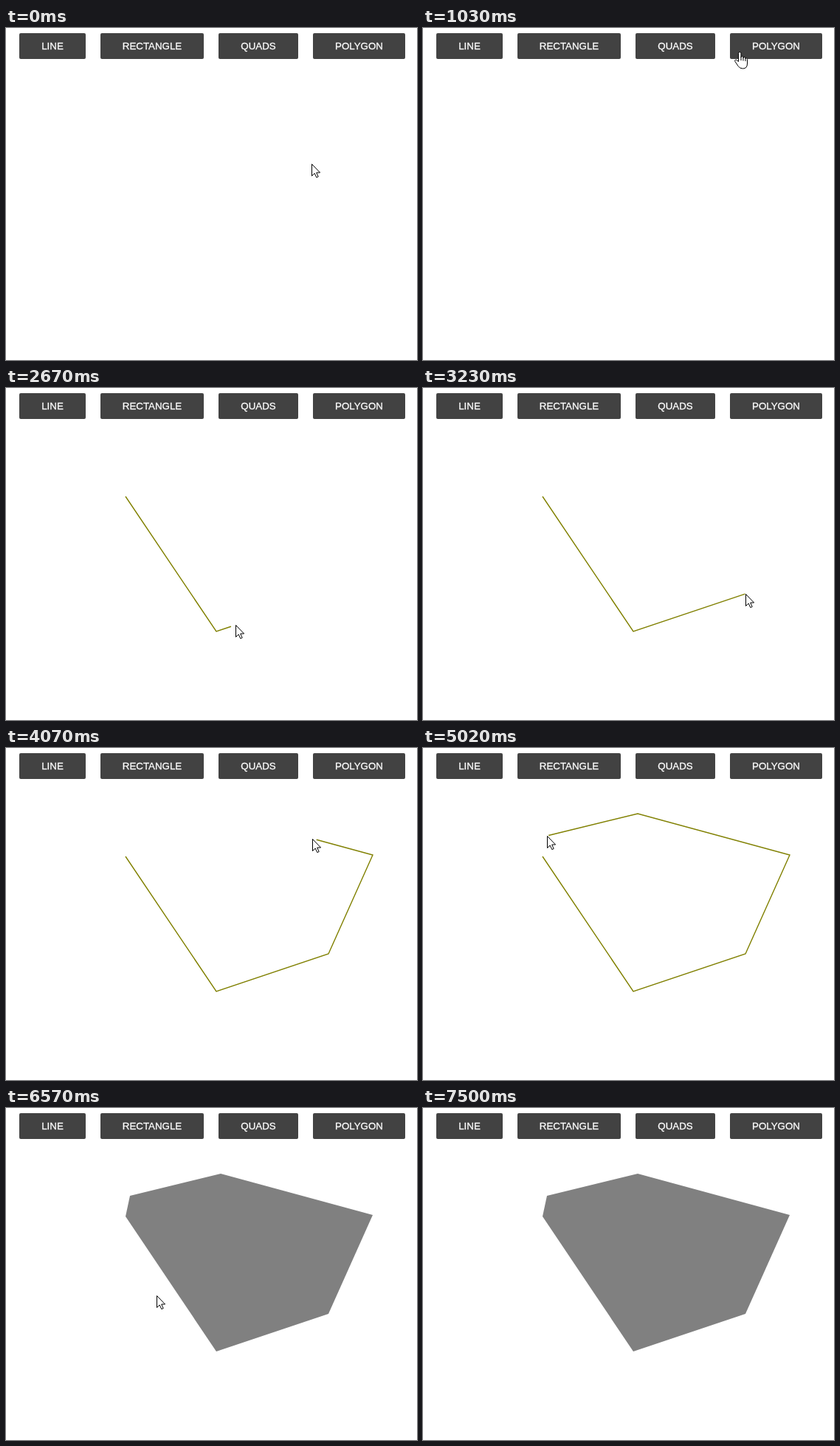
These frames come from a looping animation (557 by 450 pixels, 7610 ms). An HTML page:

```html
<!DOCTYPE html>
<html lang="en">
<head>
<meta charset="utf-8">
<title>Polygon drawing</title>
<style>
html, body { margin: 0; width: 100%; height: 100%; overflow: hidden; background: #fff; }
svg { display: block; }
text {
  font: 13.333px "Liberation Sans", Arial, sans-serif;
  fill: #fff; stroke: #fff; stroke-width: .3px;
  text-anchor: middle; font-kerning: normal;
}
</style>
</head>
<body>
<svg width="557" height="450" viewBox="0 0 557 450">
  <g id="buttons"></g>
  <polygon id="shape" fill="#808080"/>
  <polyline id="outline" fill="none" stroke="#808000" stroke-width="1.4"/>
  <g id="cursor" fill="#fff" stroke="#000">
    <path id="arrow" d="M.5 .5V16.5L4.2 13 6.8 18.6 9.2 17.5 6.7 12H11.6Z"/>
    <path id="hand" stroke-linejoin="round" d="M-1.5 12.5V1.5Q-1.5-.5 .2-.5Q2-.5 2 1.5V7Q2 5.3 3.6 5.3Q5 5.3 5 7V8Q5.3 6.3 6.6 6.4Q8 6.6 8 8.2V9Q8.5 7.6 9.5 7.8Q10.5 8 10.5 9.5V15Q10.5 22 4.5 22Q0 22-2 18.5L-6 12.5Q-7 10.8-5.6 10.2Q-4.4 9.8-3 11.2ZM2 7V11M5 8V11.5M8 9V12"/>
  </g>
</svg>
<script>
const LOOP = 7610, CLOSE = 5850;
const TRAIL = .24; // the pen runs this part of a step behind the pointer
const $ = id => document.getElementById(id);

const labels = ['LINE', 'RECTANGLE', 'QUADS', 'POLYGON'], widths = [90, 140, 108, 125];
let left = 18;
const buttons = labels.map((label, i) => {
  const button = { label, x: left, w: widths[i] };
  left += button.w + 20;
  return button;
});
$('buttons').innerHTML = buttons.map(({ label, x, w }) =>
  `<rect x="${x}" y="7" width="${w}" height="35" rx="2" fill="#424242"/>` +
  `<text x="${x + w / 2}" y="29">${label}</text>`).join('');

const corners = [[162, 147], [285, 330], [437, 279], [497, 145], [291, 89], [168, 119]];
const [A, B, C, D, E, F] = corners;

// Each move starts where the last one ended; "via" bends it, "power" slows its end.
const moves = [];
let spot = [414, 184];
function move(start, end, steps, to, { via, power = 1.6 } = {}) {
  via = via || [(spot[0] + to[0]) / 2, (spot[1] + to[1]) / 2];
  moves.push({ start, end, steps, from: spot, via, to, power });
  spot = to;
}
move(0, 0, 1, spot);
move(70, 550, 8, [431, 27], { via: [432, -10] });
move(800, 800, 1, [425, 14]);
move(950, 1026, 2, [429, 33]);
move(1102, 1710, 9, A, { via: [390, 110] });
move(1830, 2510, 9, B, { via: [247, 208] });
move(2600, 3222, 9, C);
move(3300, 3690, 6, D);
move(3860, 4620, 11, E);
move(4860, 4998, 3, F);
move(5070, 5620, 9, [165, 134], { via: [163, 205] });
move(6320, 7020, 10, [523, 429], { via: [127, 286], power: 1 });
move(7100, 7180, 2, [526, 449]);
move(7500, 7500, 1, [526, 455]);

function along({ from, via, to, power }, p) {
  const u = 1 - (1 - p) ** power, v = 1 - u;
  return [0, 1].map(i => v * v * from[i] + 2 * u * v * via[i] + u * u * to[i]);
}

function render(now) {
  const t = now % LOOP;
  const current = moves.filter(m => m.start <= t).pop();
  const { start, end, steps } = current;
  const passed = Math.floor((t - start) / (end - start || 1) * (steps - 1));
  const step = Math.min(steps, passed + 1);
  const [x, y] = along(current, step / steps).map(Math.round);

  const closed = t >= CLOSE;
  const drawn = corners.filter(c => moves.some(m => m.from === c && m.start <= t));
  if (drawn.length) drawn.push(along(current, (step - TRAIL) / steps));
  $('outline').setAttribute('points', closed ? '' : drawn.join(' '));
  $('shape').setAttribute('points', closed ? corners.join(' ') : '');

  const over = y >= 7 && y < 42 && buttons.some(b => x >= b.x && x < b.x + b.w);
  $('arrow').style.display = over ? 'none' : '';
  $('hand').style.display = over ? '' : 'none';
  $('cursor').setAttribute('transform', `translate(${x} ${y})`);
}

const began = performance.now();
function tick() {
  render(performance.now() - began);
  requestAnimationFrame(tick);
}
tick();
</script>
</body>
</html>
```
